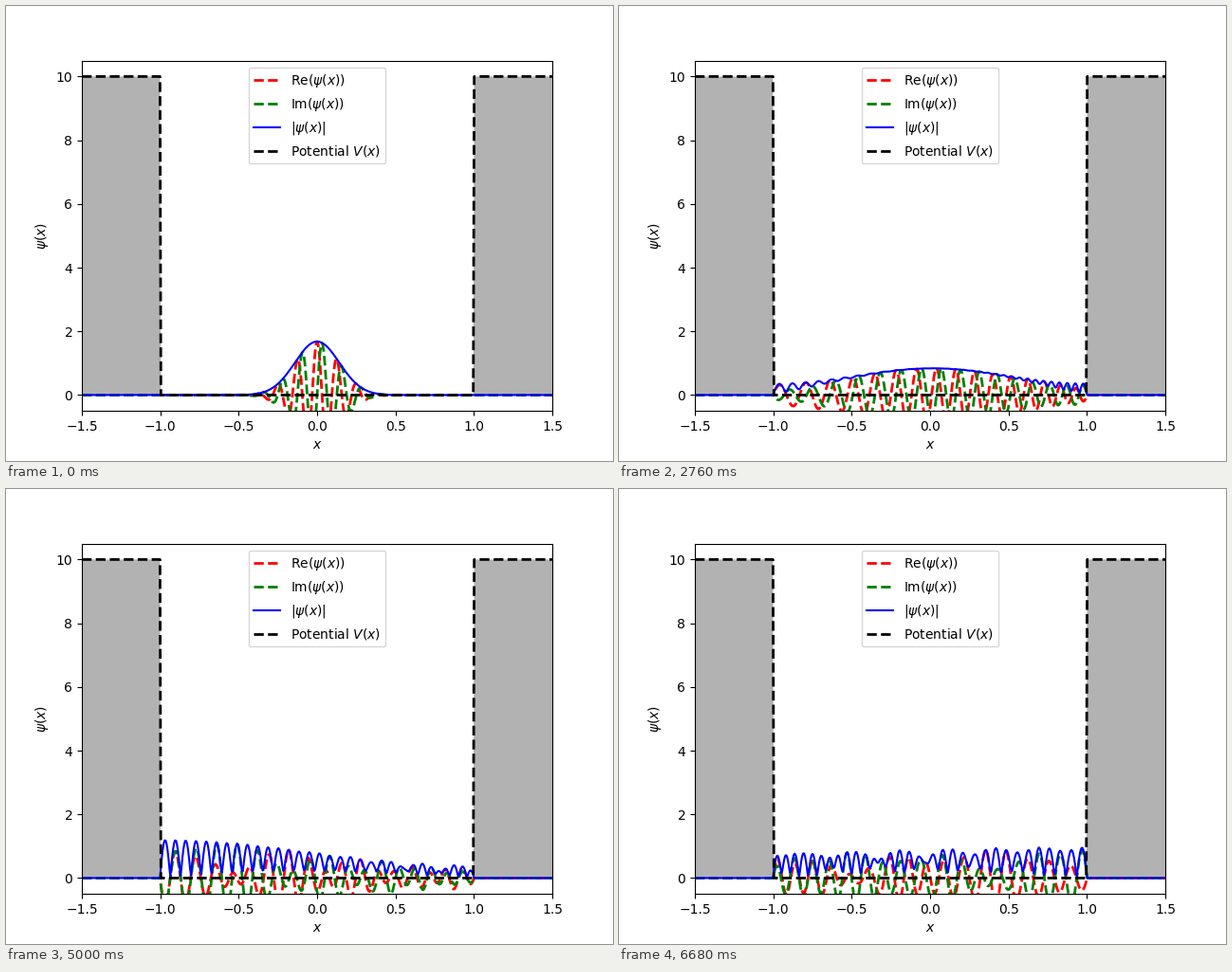
A matplotlib script that plays this animation: 640x480 px, repeating every 6.72 s.

```python
import numpy as np
import matplotlib.pyplot as plt
from matplotlib.animation import FuncAnimation

FRAMES = 168
INTERVAL = 40
DT = 0.0012       # simulated time per frame
FIRST = 2e-5      # length of the very first step
K0 = 50.0         # mean wave number
SIGMA = 0.2

x = np.linspace(-1.5, 1.5, 501)
dx = x[1] - x[0]
well = np.abs(x) < 1
V = np.where(well, 0.0, 10.0)

psi0 = np.exp(-(x / SIGMA) ** 2 + 1j * K0 * x) / np.sqrt(SIGMA * np.sqrt(np.pi))

# Eigenstates of the discrete Hamiltonian between hard walls
n = well.sum()
j = np.arange(1, n + 1)
modes = np.sqrt(2 / (n + 1)) * np.sin(np.pi * np.outer(j, j) / (n + 1))
energy = (1 - np.cos(np.pi * j / (n + 1))) / dx ** 2
coef = modes @ psi0[well]


def wave(frame):
    t = 0 if frame == 0 else FIRST + (frame - 1) * DT
    psi = np.zeros(x.size, dtype=complex)
    psi[well] = modes @ (coef * np.exp(-1j * energy * t))
    return psi


fig, ax = plt.subplots(figsize=(6.4, 4.8), dpi=100)
re_line, = ax.plot(x, psi0.real, "r--", lw=2, label=r"Re$(\psi(x))$")
im_line, = ax.plot(x, psi0.imag, "g--", lw=2, label=r"Im$(\psi(x))$")
abs_line, = ax.plot(x, np.abs(psi0), "b", lw=1.5, label=r"$|\psi(x)|$")
ax.plot(x, V, "k--", lw=2, label=r"Potential $V(x)$")
ax.fill_between(x, V, facecolor="k", alpha=0.3, lw=0)
ax.set_xlim(-1.5, 1.5)
ax.set_ylim(-0.5, 10.5)
ax.set_xlabel(r"$x$")
ax.set_ylabel(r"$\psi(x)$")
ax.legend(loc="upper center")


def update(frame):
    psi = wave(frame)
    re_line.set_ydata(psi.real)
    im_line.set_ydata(psi.imag)
    abs_line.set_ydata(np.abs(psi))
    return re_line, im_line, abs_line


anim = FuncAnimation(fig, update, frames=FRAMES, interval=INTERVAL,
                     repeat=True, repeat_delay=0)
plt.show()
```
